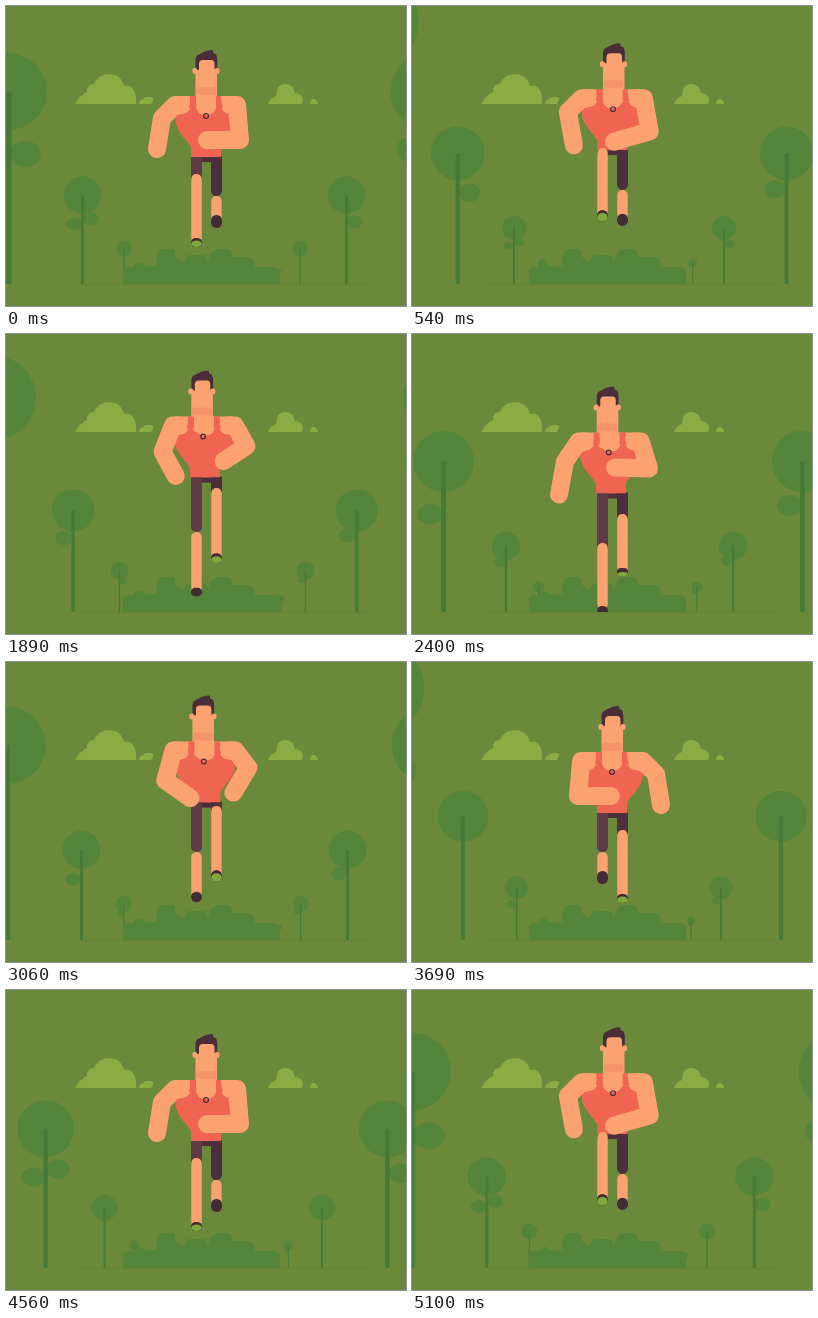
An HTML page with a canvas for the animation above (5130 ms loop, 400x300 px).

```html
<!DOCTYPE html>
<html lang="en">
<head>
<meta charset="utf-8">
<title>Runner</title>
<style>
  html, body { margin: 0; width: 100%; height: 100%; overflow: hidden; background: #6b893a; }
  canvas { display: block; width: 100vw; height: 100vh; }
</style>
</head>
<body>
<canvas id="stage" width="400" height="300"></canvas>
<script>
const ctx = document.getElementById('stage').getContext('2d');
const LOOP = 5130, STEP = 30, STRIDE = 19, TREE_GAP = 1026, GROUND = 278;
const CYCLE = 18;
const C = {
  sky: '#6b893a', leaf: '#55853a', trunk: '#457a37', cloud: '#8bab43', line: '#5f8439',
  skin: '#fca271', stubble: '#f6936a', hair: '#492d39', shirt: '#ef6551',
  shortsL: '#5f3a47', shortsR: '#4c2e3c', shoe: '#452b35', sole: '#80a83c'
};

// Pose keys: [cycle position, value], for the left side; the right side is half a cycle later.
const KNEE = [[0, 168], [2, 203], [4, 209], [6, 198], [8, 184], [9, 190], [11, 193], [13, 180], [15, 154], [17, 141]];
const FOOT = [[0, 241], [1.7, 278], [5, 278], [8, 221], [9, 222], [11, 232], [13, 242], [15, 229], [17, 215]];
const SHOE = [[0, 9], [4, 6], [8, 12], [9, 13], [13, 8], [17, 12]];
const SOLE = [[0, 3.2], [3, 0], [10, 0], [13, 2], [17, 4.4]];
const ELBOW_X = [[0, 156], [4, 153], [8, 162], [9, 166], [13, 163], [17, 156]];
const ELBOW_Y = [[0, 22], [4, 29], [8, 42], [9, 44], [13, 36], [17, 23]];
const HAND_X = [[0, 151], [4, 147], [8, 197], [9, 199], [13, 197], [17, 163]];
const HAND_Y = [[0, 53], [4, 62], [8, 53], [9, 44], [13, 35], [17, 56]];

// Foliage side clumps [side, height] for each tree of the repeating row.
const CLUMPS_L = [[[-1, .8], [1, .87]], [[1, .85]], [[-1, .87]], [[-1, .8]], []];
const CLUMPS_R = [[[1, .83]], [[-1, .88]], [[-1, .9]], [[-1, .87]], []];

const mod = (a, n) => ((a % n) + n) % n;

// Periodic cubic through the keys
function curve(keys, w) {
  const n = keys.length;
  const at = i => [keys[mod(i, n)][0] + CYCLE * Math.floor(i / n), keys[mod(i, n)][1]];
  w = mod(w, CYCLE);
  let i = n - 1;
  while (i > 0 && keys[i][0] > w) i--;
  const [a, b, c, d] = [at(i - 1), at(i), at(i + 1), at(i + 2)];
  const span = c[0] - b[0], q = (w - b[0]) / span;
  const m = (c[1] - a[1]) / (c[0] - a[0]) * span;
  const k = (d[1] - b[1]) / (d[0] - b[0]) * span;
  const q2 = q * q, q3 = q2 * q;
  return (2 * q3 - 3 * q2 + 1) * b[1] + (q3 - 2 * q2 + q) * m + (3 * q2 - 2 * q3) * c[1] + (q3 - q2) * k;
}

function fill(color, d) {
  ctx.fillStyle = color;
  ctx.fill(new Path2D(d));
}

function oval(color, x, y, rx, ry = rx) {
  if (rx <= 0 || ry <= 0) return;
  ctx.fillStyle = color;
  ctx.beginPath();
  ctx.ellipse(x, y, rx, ry, 0, 0, Math.PI * 2);
  ctx.fill();
}

function box(color, x, y, w, h, r = 0) {
  if (h <= 0) return;
  ctx.fillStyle = color;
  ctx.beginPath();
  ctx.roundRect(x, y, w, h, r);
  ctx.fill();
}

function tree(x, s, clumps) {
  const h = 1.12 * s + .0009 * s * s, w = Math.max(1, s * .038);
  oval(C.leaf, x, GROUND - h, s * .25);
  for (const [side, up] of clumps) oval(C.leaf, x + side * s * .11, GROUND - up * s, s * .1, s * .085);
  box(C.trunk, x - w / 2, GROUND - h, w, h);
}

function trees(t) {
  const shift = t / TREE_GAP;
  for (let i = Math.floor(shift) - 2; i <= shift + 2; i++) {
    const p = i - shift;
    const s = 75 * Math.exp(.7985 * p - .0855 * p * p);
    const mid = 204.5 + .053 * s, d = 57 + s, kind = mod(i, 5);
    tree(mid - d, s, CLUMPS_L[kind]);
    tree(mid + d, s, CLUMPS_R[kind]);
  }
}

function scenery() {
  box(C.line, 75, 278, 290, 1);
  fill(C.leaf, 'M117 278V265Q117 261 122 261H128Q129 256 134 257Q140 262 150 260Q151 243 156 243H166Q170 244 169 250L178 256Q179 249 184 249H197Q201 250 202 256Q205 243 211 243H222Q226 245 226 251H243Q249 252 249 261H268Q274 262 274 266V278Z');
  fill(C.cloud, 'M69 98Q74 89 81 86Q81 78 88 78Q92 68 103 68Q115 68 118 80Q123 78 127 83Q131 88 130 98Z');
  fill(C.cloud, 'M133 98Q133 94 137 93Q140 90 145 91Q148 92 147 94L145 98Z');
  fill(C.cloud, 'M262 98Q264 92 270 90Q270 78 280 78Q288 79 289 87Q295 87 297 93L296 98Z');
  fill(C.cloud, 'M304 98Q304 93 308 93Q312 94 312 98Z');
}

function leg(x, w, hip, color) {
  const knee = curve(KNEE, w), foot = Math.min(GROUND, curve(FOOT, w));
  const shoe = curve(SHOE, w), sole = curve(SOLE, w), phase = mod(w, CYCLE);
  const behind = phase > 5 && phase < 12;
  const top = Math.max(knee, hip - 3);
  if (!behind) box(color, x, hip, 11, knee - hip + 5);
  box(C.skin, x + .3, top, 10.4, foot - top - 3, 5);
  if (behind) box(color, x, hip, 11, knee - hip, [0, 0, 5.5, 5.5]);
  const flat = phase > 1.5 && phase < 5.5;
  box(C.shoe, x, foot - shoe, 11, shoe, flat ? [5, 5, 1, 1] : 5.4);
  oval(C.sole, x + 5.5, foot - sole, 5.2, sole);
}

function arm(w, s, sway, flip) {
  const fx = x => flip ? 400 - x : x;
  ctx.strokeStyle = C.skin;
  ctx.lineWidth = 18;
  ctx.lineCap = ctx.lineJoin = 'round';
  ctx.beginPath();
  ctx.moveTo(fx(178) + sway, s + 9);
  ctx.lineTo(fx(171) + sway, s + 9);
  ctx.lineTo(fx(curve(ELBOW_X, w)), s + curve(ELBOW_Y, w));
  ctx.lineTo(fx(curve(HAND_X, w)), s + curve(HAND_Y, w));
  ctx.stroke();
}

function torso(s, sway) {
  ctx.save();
  ctx.translate(sway, s);
  fill(C.skin, 'M170 0H230V20H170Z');
  ctx.restore();
  ctx.save();
  ctx.translate(sway / 2, s);
  fill(C.shirt, 'M184 0H190V8Q190 19 200 19Q210 19 210 8V0H215V9Q217 17 231 20C231 38 216 44 215 52V61H185V52C184 45 169 38 169 20Q182 17 184 9Z');
  ctx.restore();
}

function head(x, s) {
  ctx.save();
  ctx.translate(x, s);
  fill(C.hair, 'M-10.5 -24V-37Q-10 -41 -6 -42Q0 -46 7 -46Q6 -43 10 -42Q12 -39 11 -24Z');
  oval(C.skin, -11, -25, 2.6, 3);
  oval(C.skin, 11, -25, 2.6, 3);
  fill(C.skin, 'M-10.5 -26H-7V-32Q-7 -36 -3 -36H5Q8.5 -36 8.5 -32V-26H11V8Q10 17 0 17Q-10 17 -10.5 8Z');
  box(C.stubble, -10, -9, 20, 8, 3);
  ctx.restore();
}

function pendant(x, y) {
  ctx.strokeStyle = C.hair;
  ctx.lineWidth = 1.2;
  ctx.beginPath();
  ctx.arc(x, y, 2.4, 0, Math.PI * 2);
  ctx.stroke();
}

function runner(step) {
  const i = step % STRIDE;
  const w = i < 9 ? i : 9 + (i - 9) * .9;
  const s = 92.2 - 12.6 * Math.cos((w - 7) * Math.PI * 2 / 9);
  const lean = -4.8 * Math.sin(w * Math.PI * 2 / CYCLE);
  const hip = s + 61;
  box(C.shortsR, 185, hip - 1, 31, 6);
  torso(s, lean / 2);
  leg(185, w, hip, C.shortsL);
  leg(205, w + 9, hip, C.shortsR);
  head(200 + lean, s);
  pendant(200 + lean * .7, s + 20);
  // Only the skin beside the straps is covered by the arms.
  arm(w, s, lean / 2 - 2, false);
  arm(w + 9, s, lean / 2 + 2, true);
  ctx.save();
  ctx.translate(lean / 2, s);
  fill(C.shirt, 'M184 0H190V12H183Q184 8 184 0ZM210 0H215Q215 8 217 12H210Z');
  ctx.restore();
}

function draw(now) {
  const step = Math.floor((now % LOOP) / STEP);
  ctx.fillStyle = C.sky;
  ctx.fillRect(0, 0, 400, 300);
  trees(step * STEP);
  scenery();
  runner(step);
}

let start;
function tick(now) {
  start ??= now;
  draw(now - start);
  requestAnimationFrame(tick);
}
draw(0);
requestAnimationFrame(tick);
</script>
</body>
</html>
```
